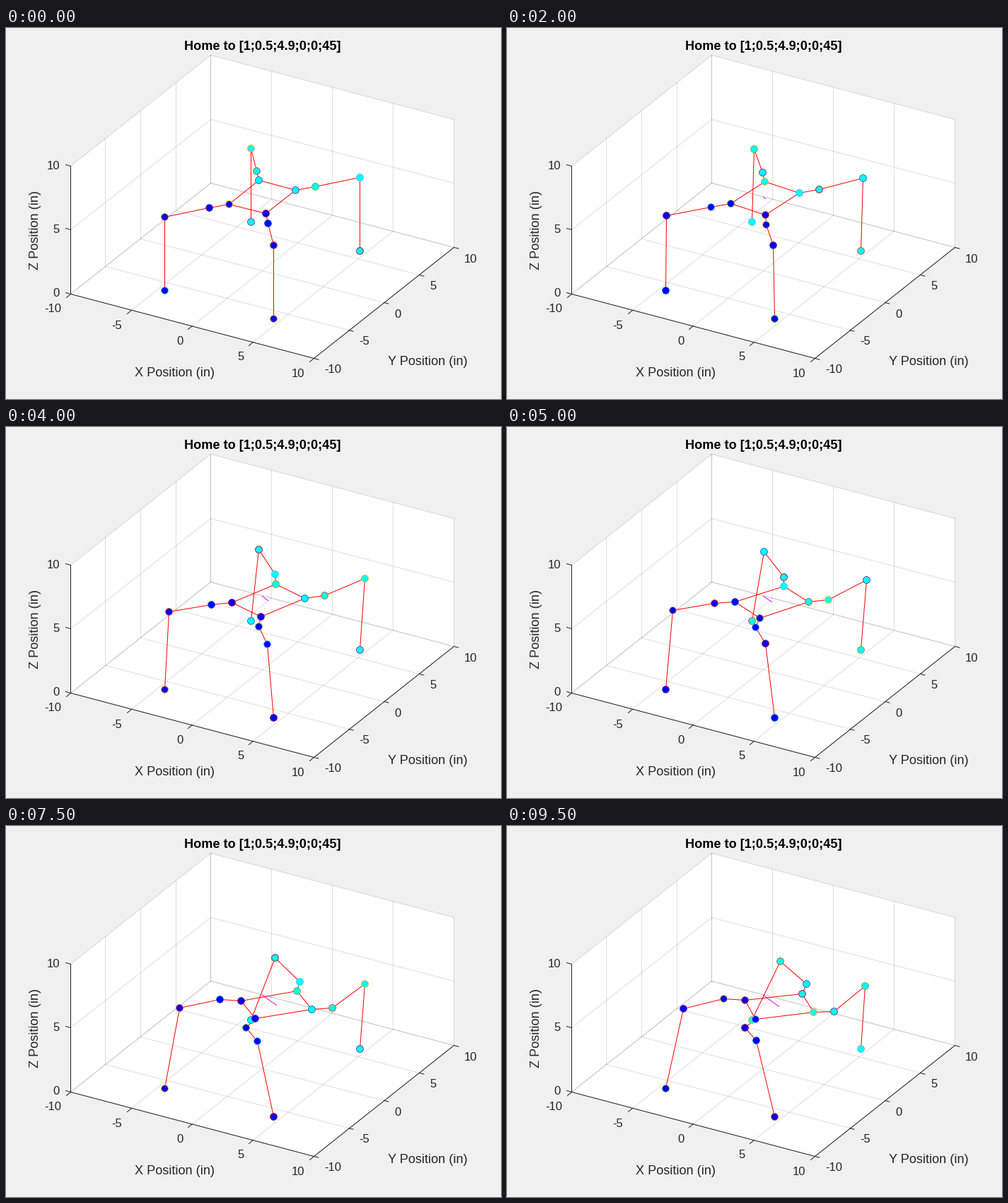
A matplotlib script for the animation above (10 s loop, 700 by 525 pixels).

```python
import numpy as np
import matplotlib.pyplot as plt
from matplotlib.animation import FuncAnimation

W, H, DPI = 700, 525, 100
FRAMES, INTERVAL = 20, 500
PX = 72 / DPI  # one pixel in points
INK = "#262626"
EDGES = ["#0072bd", "#d95319", "#edb120", "#7e2f8e", "#77ac30", "#4dbeee", "#a2142f"]

# Robot dimensions in inches; the legs mirror one hip and one foot position.
SIDES = np.array([(-1, -1), (1, -1), (1, 1), (-1, 1)])
HIPS, FEET = SIDES * (1.52, 2.12), SIDES * (4.5, 6.15)
COXA, FEMUR, TIBIA = 1.5, 3.5, 5.75
HOME, GOAL, YAW = np.array([0, 0, 5.75]), np.array([1, 0.5, 4.9]), np.radians(-45)

plt.rcParams["font.family"] = "Liberation Sans"
fig = plt.figure(figsize=(W / DPI, H / DPI), dpi=DPI, facecolor="#f0f0f0")
ax = fig.add_axes([0, 0, 1, 1])
ax.set(xlim=(0, W), ylim=(H, 0))
ax.axis("off")


def project(x, y, z):
    """Orthographic view of plot coordinates, on the centre of a stage pixel."""
    point = np.array([362.5 + 17.19 * x + 9.935 * y,
                      343.4 + 4.53 * x - 7.83 * y - 18.1 * z])
    return np.floor(point) + 0.5


def polyline(points=((0, 0),), **style):
    return ax.plot(*np.transpose(points), lw=PX, snap=False, **style)[0]


def label(x, y, text, size=16.67, color=INK, **style):
    style = {"ha": "center", "va": "center_baseline", **style}
    ax.text(x, y, text, fontsize=size * PX, color=color, **style)


def draw_walls():
    corners = [(-10, -10, 0), (10, -10, 0), (10, 10, 0),
               (10, 10, 10), (-10, 10, 10), (-10, -10, 10)]
    ax.fill(*np.transpose([project(*c) for c in corners]), color="white", lw=0)

    def grid(a, b):
        polyline([project(*a), project(*b)], color=INK, alpha=0.15, zorder=1)

    for v in range(-10, 11, 5):
        grid((v, -10, 0), (v, 10, 0))
        grid((-10, v, 0), (10, v, 0))
        grid((v, 10, 0), (v, 10, 10))
        grid((-10, v, 0), (-10, v, 10))
    for z in (0, 5, 10):
        grid((-10, -10, z), (-10, 10, z))
        grid((-10, 10, z), (10, 10, z))


def draw_axes():
    frame = [(-10, -10, 10), (-10, -10, 0), (10, -10, 0), (10, 10, 0)]
    polyline([project(*p) for p in frame], color=INK, zorder=2)

    def tick(point, mark, offset, text, ha):
        p = project(*point)
        polyline([p, p + mark], color=INK, zorder=2)
        label(*(p + offset), text, ha=ha)

    for v in range(-10, 11, 5):
        tick((v, -10, 0), (-6, 5), (-13, 20), str(v), "right")
        tick((10, v, 0), (6.5, 1.7), (14.5, 15), str(v), "left")
    for z in (0, 5, 10):
        tick((-10, -10, z), (-7, -2), (-15.5, -2), str(z), "right")
    label(238, 486.5, "X Position (in)", 18.2)
    label(596, 470.5, "Y Position (in)", 18.2)
    label(41.5, 286.5, "Z Position (in)", 18.2, rotation=90, va="center")
    label(363, 24.8, "Home to [1;0.5;4.9;0;0;45]", 18.2, "black", weight="bold")


def heading(angle):
    return np.array([np.cos(angle), np.sin(angle), 0])


def leg_joints(hip, foot, yaw):
    """Hip, shoulder, knee and foot; the shoulder link also turns with the body."""
    bearing = np.arctan2(*(foot - hip)[1::-1])
    shoulder = hip + COXA * heading(bearing + yaw)
    reach = foot - shoulder
    out, drop = reach @ heading(bearing), -reach[2]
    along = (FEMUR ** 2 + reach @ reach - TIBIA ** 2) / (2 * FEMUR)
    bend = np.arccos(np.clip(along / np.hypot(out, drop), -1, 1))
    lift = bend - np.arctan2(drop, out)
    knee = shoulder + FEMUR * (np.cos(lift) * heading(bearing)
                               + np.sin(lift) * np.array([0, 0, 1]))
    return [hip, shoulder, knee, foot]


def pose(s):
    """Body centre and stage positions of all joints, shape (leg, joint, 2)."""
    centre, yaw = HOME + (GOAL - HOME) * s, YAW * s
    turn = np.array([heading(yaw)[:2], heading(yaw + np.pi / 2)[:2]])
    legs = [leg_joints(centre + np.append(hip @ turn, 0), np.append(foot, 0), yaw)
            for hip, foot in zip(HIPS, FEET)]
    return project(*centre), np.array([[project(*p) for p in leg] for leg in legs])


draw_walls()
draw_axes()

trail = polyline(color="magenta", zorder=3)
body = polyline(color="red", zorder=4)
limbs = [polyline(color="red", zorder=4) for _ in SIDES]
dots = [ax.scatter([0] * 4, [0] * 4, s=(9.8 * PX) ** 2, lw=0.9 * PX,
                   color="blue" if y < 0 else "cyan", zorder=5 - y)
        for _, y in SIDES]


def update(i):
    u = i / (FRAMES - 1)
    centre, legs = pose(u * u * (3 - 2 * u))
    trail.set_data(*np.transpose([project(*HOME), centre]))
    body.set_data(*legs[[0, 1, 2, 3, 0], 0].T)
    for leg, joints in enumerate(legs):
        limbs[leg].set_data(*joints.T)
        dots[leg].set_offsets(joints)
        dots[leg].set_edgecolor([EDGES[(4 * (i + leg) + joint + 2) % 7]
                                 for joint in range(4)])
    return [trail, body, *limbs, *dots]


anim = FuncAnimation(fig, update, frames=FRAMES, interval=INTERVAL,
                     repeat=True, repeat_delay=0, blit=False)
plt.show()
```
